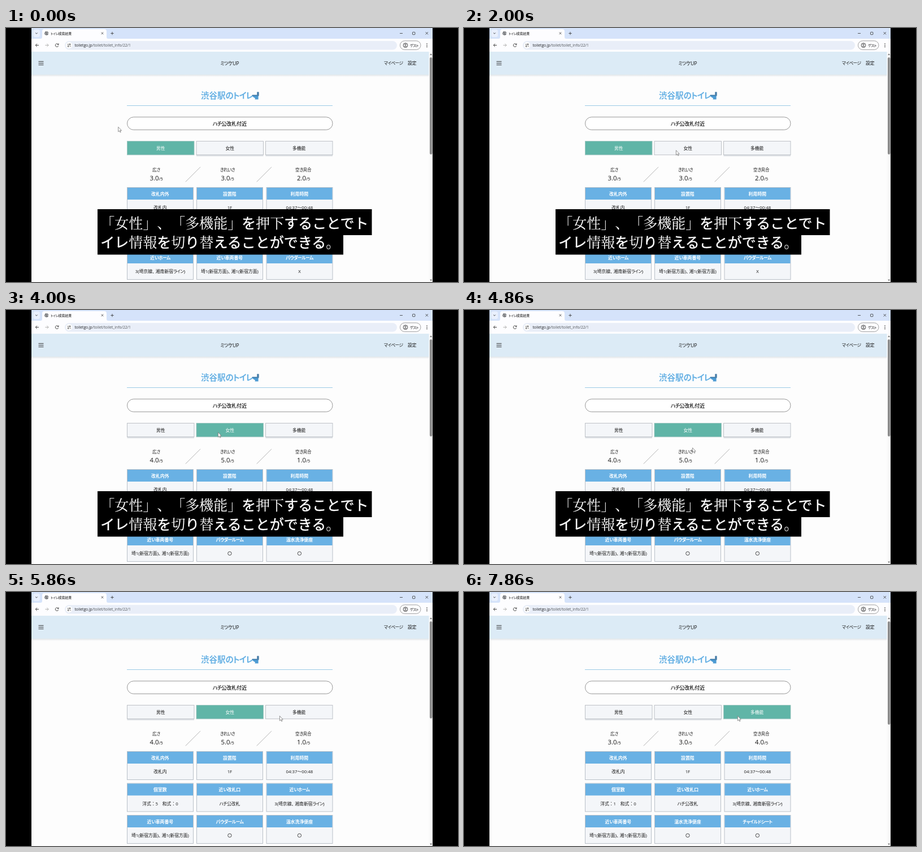
Animation, 800 px wide and 450 px high, one loop 8 s. Source, as an HTML page:

```html
<!DOCTYPE html>
<html lang="ja">
<head>
<meta charset="utf-8">
<style>
html, body { margin: 0; width: 100%; height: 100%; overflow: hidden; background: #000; }
svg { display: block; width: 800px; height: 450px; }
text { font-family: "Open Sans", "Noto Sans CJK JP", "Noto Sans CJK", sans-serif; font-feature-settings: "palt"; text-spacing-trim: space-all; white-space: pre; }
.kana { letter-spacing: -.08em; }
.wide { font-feature-settings: normal; }
.cap { font-family: "Noto Sans CJK JP", "Noto Sans CJK", sans-serif; font-feature-settings: "chws" 0, "palt" 0, "halt" 0; font-weight: 500; fill: #fff; stroke: #fff; stroke-width: .45px; }
.thin { font-family: "Noto Serif CJK JP", "Noto Serif JP", "Noto Sans CJK JP", "Noto Sans CJK", serif; font-weight: 300; stroke-width: .1px; }
</style>
</head>
<body>
<svg id="stage" viewBox="0 0 800 450" xmlns="http://www.w3.org/2000/svg">
  <defs>
    <linearGradient id="fade" x2="0" y2="1">
      <stop offset="0" stop-color="#8c9aa8" stop-opacity=".4"/>
      <stop offset="1" stop-color="#8c9aa8" stop-opacity="0"/>
    </linearGradient>
  </defs>
  <rect width="800" height="450"/>
  <rect x="45" width="710" height="450" fill="#fdfdfd"/>
  <g id="browser"></g>
  <g id="page"></g>
  <g id="caption"></g>
  <g id="cursor">
    <path d="M.4 .3V8.8L2.4 7L3.7 9.9L5 9.3L3.7 6.5H6.2Z" fill="#fff" stroke="#777" stroke-width=".8" stroke-linejoin="round"/>
  </g>
</svg>
<script>
const NS = 'http://www.w3.org/2000/svg';
const $ = id => document.getElementById(id);

function add(parent, tag, attrs, body) {
  const el = document.createElementNS(NS, tag);
  for (const k in attrs) el.setAttribute(k, attrs[k]);
  if (body !== undefined) el.textContent = body;
  parent.appendChild(el);
  return el;
}

const rect = (p, x, y, width, height, fill, more) =>
  add(p, 'rect', { x, y, width, height, fill, ...more });

const line = (p, d, stroke, width = 1, more) =>
  add(p, 'path', { d, stroke, fill: 'none', 'stroke-width': width, ...more });

// Kana are set a little tighter than kanji.
function setText(el, str) {
  el.textContent = '';
  for (const run of str.match(/[ぁ-ヿ]+|[^ぁ-ヿ]+/g) || [])
    add(el, 'tspan', /[ぁ-ヿ]/.test(run) ? { class: 'kana' } : {}, run);
}

// Text placed by its vertical centre.
function label(p, x, cy, str, size, more) {
  const el = add(p, 'text', {
    x, y: cy + size * .37, 'font-size': size, fill: '#151515', 'text-anchor': 'middle', ...more
  });
  setText(el, str);
  return el;
}

const START = { 'text-anchor': 'start' };
const BOLD = { 'font-weight': 700 };

let thumb;
function drawBrowser(g) {
  const ink = '#333';
  rect(g, 45, 0, 710, 24, '#d5e3fa');
  rect(g, 48, 2.5, 12, 13.5, '#e9f0fd', { rx: 3.5 });
  line(g, 'M52.2 8.5L54 10.3L55.8 8.5', ink, .9);
  add(g, 'path', { d: 'M61 19Q64 19 64 16V6Q64 2 68 2H174Q178 2 178 6V16Q178 19 181 19Z', fill: '#fdfdff' });
  rect(g, 45, 19, 710, 23, '#fdfdff');

  add(g, 'circle', { cx: 71.7, cy: 9.4, r: 3.3, fill: '#5a5d61' });
  line(g, 'M69.2 8.2L71 9.6L70.7 11.8M72 6.6L72.2 8L74.3 9.4L73.2 11', '#fff', .9);
  label(g, 79, 9.6, 'トイレ検索結果', 5.9, START);
  line(g, 'M168.7 7.6L172.3 11.2M172.3 7.6L168.7 11.2', ink, .8);
  line(g, 'M185.3 9.5H190.7M188 6.8V12.2', ink, .8);
  line(g, 'M697 9.5H702', ink, .8);
  rect(g, 719.5, 7.3, 4.4, 4.4, 'none', { stroke: ink, 'stroke-width': .8, rx: .8 });
  line(g, 'M742.6 7.1L747 11.5M747 7.1L742.6 11.5', ink, .8);

  line(g, 'M58 30.5H52.4M55 27.7L52.2 30.5L55 33.3', ink, .9);
  line(g, 'M69.4 30.5H75M72.4 27.7L75.2 30.5L72.4 33.3', '#aaa', .9);
  line(g, 'M92.6 29.2A2.8 2.8 0 1 0 92.8 31.4M93 27.4V29.5H90.9', ink, .9);

  rect(g, 104, 23, 588, 15.5, '#e9eef8', { rx: 7.75 });
  add(g, 'circle', { cx: 111.7, cy: 30.6, r: 5.6, fill: '#fff' });
  line(g, 'M108.6 29H111M113.4 32.3H115', ink, .8);
  add(g, 'circle', { cx: 113, cy: 29, r: 1.1, fill: 'none', stroke: ink, 'stroke-width': .8 });
  add(g, 'circle', { cx: 110.3, cy: 32.3, r: 1.1, fill: 'none', stroke: ink, 'stroke-width': .8 });
  const url = add(g, 'text', { x: 121.5, y: 33, 'font-size': 6.7, fill: '#202124' });
  add(url, 'tspan', {}, 'toiletgo.jp');
  add(url, 'tspan', { fill: '#505458' }, '/toilet/toilet_info/22/1');

  rect(g, 697.5, 22.8, 36.5, 15.6, '#fdfdff', { rx: 7.8, stroke: '#888', 'stroke-width': .8 });
  add(g, 'circle', { cx: 707, cy: 30.6, r: 3.9, fill: 'none', stroke: ink, 'stroke-width': .9 });
  add(g, 'circle', { cx: 707, cy: 29.6, r: 1.3, fill: 'none', stroke: ink, 'stroke-width': .8 });
  line(g, 'M704.6 33.3Q707 31.2 709.4 33.3', ink, .8);
  label(g, 715, 30.6, 'ゲスト', 6.2, START);
  for (const y of [27.8, 30.6, 33.4]) add(g, 'circle', { cx: 745, cy: y, r: .8, fill: ink });

  rect(g, 748.5, 42, 6.5, 408, '#fafafa');
  thumb = rect(g, 750, 52, 4.4, 172, '#8b8b8b', { rx: 2.2 });
  add(g, 'path', { d: 'M750.2 48L752.2 45L754.2 48ZM750.2 445.5L752.2 448.5L754.2 445.5Z', fill: '#777' });
}

const COLS = [214.5, 337.5, 461];
const ROWS = [282.5, 339, 395.5];
const BUTTONS = [214.5, 337, 459.5];
const buttons = [], scores = [], cells = [];

function drawPage(g) {
  rect(g, 45, 42, 703.5, 40.7, '#dcebf6');
  rect(g, 45, 82.7, 703.5, 4, 'url(#fade)', { opacity: .6 });
  line(g, 'M57.5 59.3H66.5M57.5 62.3H66.5M57.5 65.3H66.5', '#333', 1);
  label(g, 396, 62.5, 'ミツケUP', 8.8);
  label(g, 669, 62.5, 'マイページ', 7.7, START);
  label(g, 718.8, 62.5, '設定', 7.8);

  label(g, 345, 119.5, '渋谷駅のトイレ', 14.5, { ...START, ...BOLD, fill: '#67b1e4' });
  add(g, 'path', { d: 'M436 119.6H446.6V126.4H440.6L440.9 124.2Q436.8 123 436 119.6Z', fill: '#4d9bd3' });
  rect(g, 435.6, 118.4, 9.5, 1.8, '#3b78a8', { rx: .9 });
  rect(g, 444.2, 113.3, 3.5, 7.2, '#4b7fa8', { rx: .7 });
  line(g, 'M214 137.5H578', '#9ccbe6');
  rect(g, 214.5, 157.8, 363.5, 22.6, '#fff', { rx: 11.3, stroke: '#8c8c8c', 'stroke-width': .9 });
  label(g, 396, 169.3, 'ハチ公改札付近', 9, { stroke: '#151515', 'stroke-width': .2 });

  ['男性', '女性', '多機能'].forEach((s, i) => {
    const x = BUTTONS[i];
    buttons.push({
      shade: rect(g, x, 225, 118.5, 3.5, 'url(#fade)'),
      box: rect(g, x, 200.6, 118.5, 24.2, '#f4f6f9', { stroke: '#b7bbc1', 'stroke-width': .9 }),
      text: label(g, x + 59.2, 213, s, 7.8)
    });
  });

  [['広さ', 265.8, 254.5], ['きれいさ', 392, 380.5], ['空き具合', 526.3, 515]].forEach(([s, cx, x]) => {
    label(g, cx, 251, s, 7.6);
    const t = add(g, 'text', { x, y: 269.7, 'font-size': 11.3, fill: '#151515', 'font-weight': 500 });
    scores.push(add(t, 'tspan', {}, ''));
    add(t, 'tspan', { 'font-size': 7.8 }, '/5');
  });
  line(g, 'M317.8 272.5L344 246.3M443.8 272.5L470 246.3', '#a0a0a0', .8);

  for (const y of ROWS) for (const x of COLS) {
    const cx = x + 58.4;
    rect(g, x, y, 117, 50, '#f4f6f9', { stroke: '#b9c0c8' });
    rect(g, x + .5, y + .5, 116, 21, '#69b1e4');
    cells.push({
      head: label(g, cx, y + 11.2, '', 7.9, { ...BOLD, fill: '#fff' }),
      value: label(g, cx, y + 35.8, '', 7.8),
      ring: add(g, 'circle', { cx, cy: y + 35.8, r: 3.2, fill: 'none', stroke: '#222', 'stroke-width': .8 })
    });
  }
}

function drawCaption(g) {
  rect(g, 162, 321, 485.5, 46, '#000');
  rect(g, 162, 361, 435, 40.5, '#000');
  ['「女性」、「多機能」を押下することでト', 'イレ情報を切り替えることができる。'].forEach((s, i) => {
    const t = add(g, 'text', { x: 167.3, y: 354.5 + i * 34.4, 'font-size': 25, class: 'cap' });
    for (const run of s.match(/[ぁ-ヿ]+|[^ぁ-ヿ]+/g))
      add(t, 'tspan', /[ぁ-ヿ]/.test(run) ? {} : { class: 'thin' }, run);
  });
}

const PLACE = [['改札内外', '改札内'], ['設置階', '1F'], ['利用時間', '04:37～00:48']];
const GATE = ['近い改札口', 'ハチ公改札'];
const PLATFORM = ['近いホーム', '3(埼京線、\u2005湘南新宿ライン)'];
const CAR = ['近い車両番号', '埼1(新宿方面)、\u2005湘1(新宿方面)'];
const stalls = n => ['個室数', `洋式：${n}　和式：0`];

const TABS = [
  { scores: ['3.0', '3.0', '2.0'], bar: 172,
    cells: [...PLACE, stalls(3), ['小便器数', '5'], GATE, PLATFORM, CAR, ['パウダールーム', 'X']] },
  { scores: ['4.0', '5.0', '1.0'], bar: 172,
    cells: [...PLACE, stalls(5), GATE, PLATFORM, CAR, ['パウダールーム', 'O'], ['温水洗浄便座', 'O']] },
  { scores: ['3.0', '3.0', '4.0'], bar: 183,
    cells: [...PLACE, stalls(1), GATE, PLATFORM, CAR, ['温水洗浄便座', 'O'], ['チャイルドシート', 'O']] }
];

let shown = -1;
function showTab(n) {
  if (n === shown) return;
  shown = n;
  const tab = TABS[n];
  tab.scores.forEach((s, i) => scores[i].textContent = s);
  tab.cells.forEach(([head, value], i) => {
    const c = cells[i], ring = value === 'O';
    setText(c.head, head);
    setText(c.value, ring ? '' : value);
    c.value.setAttribute('class', value.includes('：') ? 'wide' : '');
    c.ring.style.display = ring ? '' : 'none';
  });
  thumb.setAttribute('height', tab.bar);
  buttons.forEach((b, i) => {
    const on = i === n;
    b.box.setAttribute('fill', on ? '#60b5a7' : '#f4f6f9');
    b.box.setAttribute('stroke', on ? '#9cc4be' : '#b7bbc1');
    b.text.setAttribute('fill', on ? '#fff' : '#151515');
  });
}

// Pointer path: step, x, y
const PATH = [
  [3, 198.3, 175], [4, 204, 181], [7, 262, 212], [9, 315, 228], [11, 350, 226], [14, 375, 216.4],
  [29, 375, 216.4], [30, 398, 217.5], [32, 398, 217.5], [33, 400, 231], [34, 404, 243.7],
  [35, 433, 249.3], [36, 452, 248], [37, 468, 240], [38, 478, 230], [39, 483, 222], [40, 484, 219.3]
];

function pointer(step) {
  if (step <= PATH[0][0]) return PATH[0].slice(1);
  const i = PATH.findIndex(p => p[0] >= step);
  if (i < 0) return PATH[PATH.length - 1].slice(1);
  const [a, ax, ay] = PATH[i - 1], [b, bx, by] = PATH[i];
  const k = (step - a) / (b - a);
  return [ax + (bx - ax) * k, ay + (by - ay) * k];
}

const LOOP = 8000, RATE = 7;
function render(ms) {
  const step = Math.floor((ms % LOOP + 5) * RATE / 1000);
  const [x, y] = pointer(step);
  $('cursor').setAttribute('transform', `translate(${x} ${y})`);
  showTab(step < 23 ? 0 : step < 44 ? 1 : 2);
  buttons.forEach((b, i) => {
    const over = x >= BUTTONS[i] && x < BUTTONS[i] + 118.5 && y > 200 && y < 225;
    b.shade.style.display = over || i === shown ? 'none' : '';
  });
  $('caption').style.display = step < 35 ? '' : 'none';
}

drawBrowser($('browser'));
drawPage($('page'));
drawCaption($('caption'));

const begin = performance.now();
function tick() {
  render(performance.now() - begin);
  requestAnimationFrame(tick);
}
render(0);
requestAnimationFrame(tick);
</script>
</body>
</html>
```
